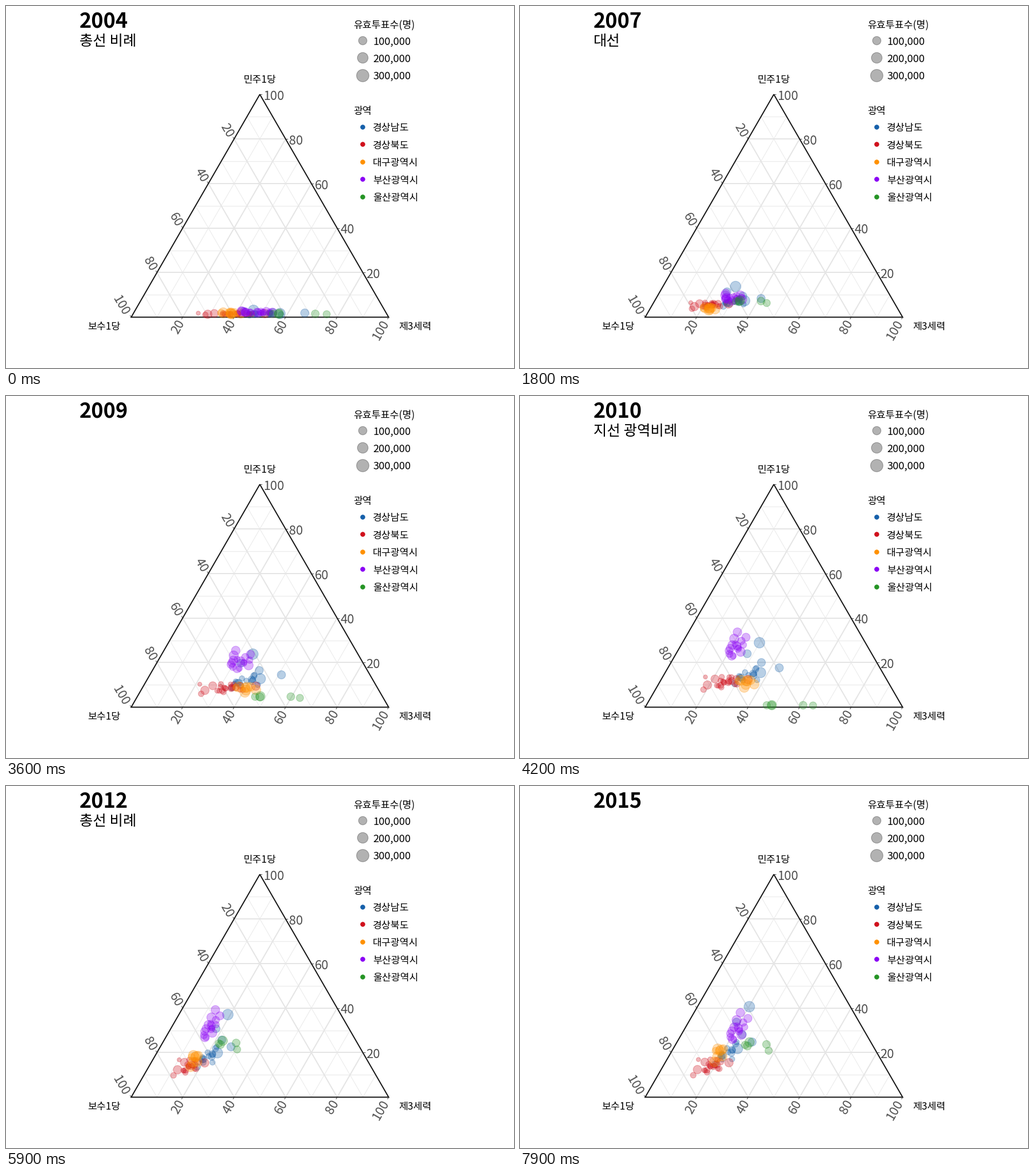
These frames come from a looping animation (885 by 632 pixels, 8 s). A matplotlib script:

```python
import numpy as np
import matplotlib.pyplot as plt
from matplotlib.animation import FuncAnimation
from matplotlib.colors import to_rgba

W, H, DPI = 885, 632, 100
FRAMES, STEP = 80, 14 / 99
PX = 72 / DPI
TOP, LEFT, RIGHT = np.array([(442.2, 154.3), (218.1, 543.3), (666.6, 543.3)])
VOTES = {2004: "총선 비례", 2006: "지선 광역비례", 2007: "대선",
         2008: "총선 비례", 2010: "지선 광역비례", 2012: "총선 비례",
         2014: "지선 광역비례", 2016: "총선 비례"}
YEARS = list(VOTES)

# Mean shares in percent per vote; each district scales them by its own factors.
# "special" lists districts that stand out: radius, factor of third, of dem.
REGIONS = [
    dict(name="경상남도", color="#1660aa", count=14, size=(4, 6.5), spread=(.075, .13),
         third=[50, 29.6, 31.6, 46, 32.1, 22.2, 13.3, 28],
         dem=[1.5, 1.8, 10.8, 8.4, 14.3, 17.4, 21.4, 18.7],
         special=[(9.3, .92, 2.05), (9, 1.14, 1.1), (7, .85, 1.7),
                  (7.2, 1.33, 1.25), (7, 1.08, 1.42)]),
    dict(name="경상북도", color="#d0101c", count=18, size=(3.8, 6.2), spread=(.085, .12),
         third=[39.3, 24.8, 20.8, 43.4, 25.4, 17.5, 9, 26.2],
         dem=[1.5, 2.8, 7.6, 5.1, 11.5, 13.8, 14.9, 13.5],
         special=[(5, .72, .7), (7.4, .74, .88), (7, .8, 1.12),
                  (3.6, .64, 1.2), (7.4, 1.3, 1.1)]),
    dict(name="대구광역시", color="#ff9100", count=8, size=(5, 9.2), spread=(.06, .1),
         third=[37.6, 21, 24.5, 48.9, 33.1, 18.1, 6, 27.8],
         dem=[1.8, 1.3, 6, 4.8, 11.3, 15.9, 23, 17.5],
         special=[]),
    dict(name="부산광역시", color="#8a00f5", count=13, size=(4.8, 7.6), spread=(.065, .09),
         third=[47.6, 31.7, 28.2, 45.2, 21.1, 16.3, 9.2, 28.8],
         dem=[2.2, 2.5, 13.5, 11.8, 27.2, 30.7, 33.1, 28],
         special=[(7.5, .87, 1.26), (8, .88, 1.15), (8, 1.13, .93)]),
    dict(name="울산광역시", color="#259425", count=0, size=(6, 7), spread=(0, 0),
         third=[56.6, 33.1, 33.1, 46.4, 48.8, 24.2, 16.5, 36.5],
         dem=[1.5, .9, 12.5, 9.7, .6, 24.2, 25.1, 22.7],
         special=[(6.8, 1.25, 1), (6.3, 1.33, .88), (8.2, 1, 1.04),
                  (7, 1, .97), (6.5, .96, .99)]),
]


def districts(region, seed):
    """Rows of radius, factor of third, factor of dem."""
    rng = np.random.default_rng(seed)
    n = region["count"]
    radii = rng.uniform(*region["size"], (n, 1))
    noise = np.clip(rng.normal(size=(n, 2)), -1.8, 1.8)
    if n:
        noise = (noise - noise.mean(0)) / noise.std(0)
    rows = np.hstack([radii, 1 + noise * region["spread"]])
    return np.vstack([rows, np.reshape(region["special"], (-1, 3))])


def place(third, dem):
    """Stage position of shares in percent."""
    third, dem = np.asarray(third)[..., None], np.asarray(dem)[..., None]
    return LEFT + (RIGHT - LEFT) * third / 100 + (TOP - LEFT) * dem / 100


def positions(t):
    return np.vstack([place(np.interp(t, YEARS, region["third"]) * rows[:, 1],
                            np.interp(t, YEARS, region["dem"]) * rows[:, 2])
                      for region, rows in zip(REGIONS, DOTS)])


plt.rcParams["font.family"] = ["Noto Sans CJK JP"]
fig = plt.figure(figsize=(W / DPI, H / DPI), dpi=DPI, facecolor="white")
ax = fig.add_axes([0, 0, 1, 1])
ax.set(xlim=(0, W), ylim=(H, 0))
ax.axis("off")


def label(x, y, text, size, ha="left", color="black", **kw):
    return ax.text(x, y + .37 * size, text, fontsize=size * PX, ha=ha,
                   va="baseline", color=color, **kw)


def turned(xy, value, angle):
    ax.text(*xy, value, fontsize=22 * PX, rotation=angle, ha="center",
            va="center", color="#4d4d4d")


def line(a, b, color, width):
    ax.plot(*zip(a, b), color=color, lw=width * PX, zorder=1, solid_capstyle="butt")


def circles(xy, radii, colors, alpha):
    x, y = np.transpose(xy)
    rgba = [to_rgba(c, alpha) for c in colors]
    return ax.scatter(x, y, s=(2 * np.array(radii) * PX)**2, facecolors=rgba,
                      edgecolors=rgba, linewidths=1.1 * PX, zorder=3)


def grid(f, color, width):
    for a, b, c in ((TOP, LEFT, RIGHT), (LEFT, TOP, RIGHT), (RIGHT, TOP, LEFT)):
        line(b + (a - b) * f, c + (a - c) * f, color, width)


for value in range(10, 100, 20):
    grid(value / 100, "#ebebeb", 1.1)
for value in range(20, 100, 20):
    grid(value / 100, "#e5e5e5", 2)
ax.add_patch(plt.Polygon([TOP, LEFT, RIGHT], fill=False, ec="#1a1a1a",
                         lw=2 * PX, zorder=2))

for value in range(20, 101, 20):
    f = value / 100
    right, left, base = place(0, 0) + [
        (RIGHT - LEFT) * (1 - f) + (TOP - LEFT) * f,
        (TOP - LEFT) * (1 - f),
        (RIGHT - LEFT) * f]
    line(right, right + (4, 0), "#555555", 1)
    line(left, left + (-2, -3.5), "#555555", 1)
    line(base, base + (-2, 3.5), "#555555", 1)
    reach = 15 + 6 * (len(str(value)) - 2)
    label(right[0] + 5.5, right[1] + 1.5, value, 22, color="#4d4d4d")
    turned(left + (2 - reach) * np.array([1, 0]) - (0, reach - .5), value, -60)
    turned(base + (7 - reach, reach + 2), value, 60)

label(442, 128, "민주1당", 17.2, "center")
label(171, 559, "보수1당", 17.2, "center")
label(712.5, 559, "제3세력", 17.2, "center")

label(605, 32, "유효투표수(명)", 17.3)
for k, (r, text) in enumerate(((7.3, "100,000"), (9.3, "200,000"), (10.8, "300,000"))):
    y = 60 + 30.4 * k
    circles([(621, y)], [r], ["black"], .3)
    label(639, y + .5, text, 18.4)
label(605, 183, "광역", 17.3)
for k, region in enumerate(REGIONS):
    y = 211 + 30.4 * k
    circles([(621, y)], [3.7], [region["color"]], 1)
    label(639, y + 1, region["name"], 17.2)

DOTS = [districts(region, seed + 7) for seed, region in enumerate(REGIONS)]
cloud = circles(positions(2004), np.vstack(DOTS)[:, 0],
                [g["color"] for g, rows in zip(REGIONS, DOTS) for _ in rows], .3)
year_text = label(128, 24.5, "", 36, weight="bold")
vote_text = label(127.5, 59.5, "", 25.4)


def draw(i):
    t = 2004 + STEP * i
    year = round(t)
    cloud.set_offsets(positions(t))
    year_text.set_text(str(year))
    vote_text.set_text(VOTES.get(year, ""))
    return cloud, year_text, vote_text


anim = FuncAnimation(fig, draw, frames=FRAMES, interval=100, repeat=True,
                     repeat_delay=0, blit=False)
plt.show()
```
